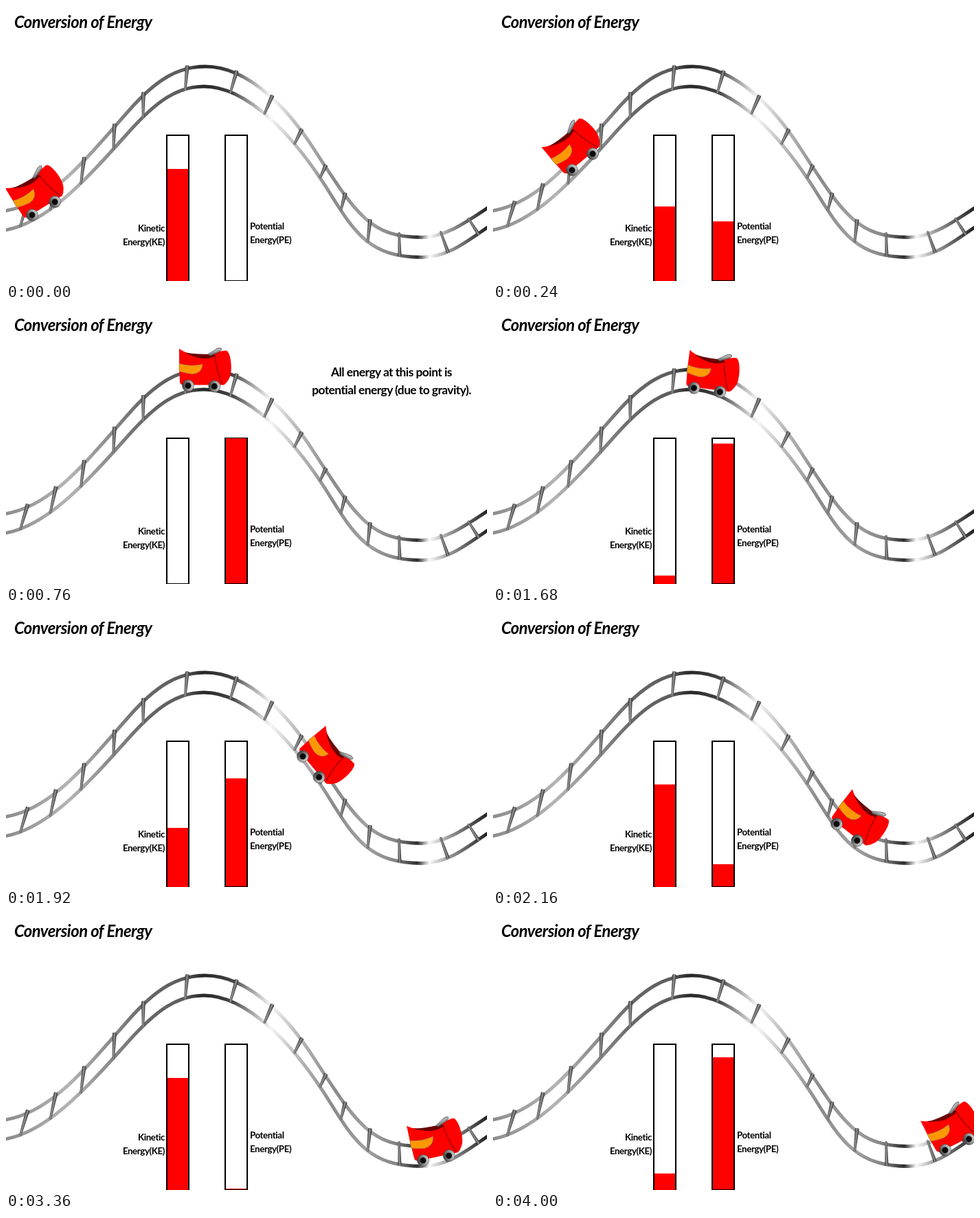
An HTML page that plays this animation: 700x400 px, repeating every 4.08 s.

```html
<!DOCTYPE html>
<html lang="en">
<head>
<meta charset="utf-8">
<title>Conversion of Energy</title>
<style>
html, body { margin: 0; width: 100%; height: 100%; overflow: hidden; background: #fff; }
svg { display: block; width: 700px; height: 400px; }
text { font-family: Lato, "Open Sans", sans-serif; font-weight: 700; }
.title { font-size: 23.8px; font-style: italic; letter-spacing: -.5px; }
.label { font-size: 13.3px; letter-spacing: -.4px; }
.note { font-size: 17.3px; letter-spacing: -.5px; text-anchor: middle; }
.end { text-anchor: end; }
.rail { fill: none; stroke: url(#steel); stroke-width: 5; }
.frame { fill: #fff; stroke: #000; stroke-width: 2; }
</style>
</head>
<body>
<svg viewBox="0 0 700 400">
  <defs>
    <linearGradient id="steel" gradientUnits="userSpaceOnUse" x1="0" x2="700" y1="0" y2="0">
      <stop offset="0" stop-color="#8c8c8c"/>
      <stop offset=".13" stop-color="#b4b4b4"/>
      <stop offset=".29" stop-color="#686868"/>
      <stop offset=".37" stop-color="#5c5c5c"/>
      <stop offset=".41" stop-color="#262626"/>
      <stop offset=".47" stop-color="#444"/>
      <stop offset=".5" stop-color="#8a8a8a"/>
      <stop offset=".55" stop-color="#f6f6f6"/>
      <stop offset=".6" stop-color="#bdbdbd"/>
      <stop offset=".68" stop-color="#8a8a8a"/>
      <stop offset=".75" stop-color="#a0a0a0"/>
      <stop offset=".81" stop-color="#858585"/>
      <stop offset=".855" stop-color="#2c2c2c"/>
      <stop offset=".88" stop-color="#fafafa"/>
      <stop offset=".92" stop-color="#9a9a9a"/>
      <stop offset="1" stop-color="#222"/>
    </linearGradient>
    <linearGradient id="post">
      <stop offset="0" stop-color="#222"/>
      <stop offset=".45" stop-color="#999"/>
      <stop offset="1" stop-color="#2a2a2a"/>
    </linearGradient>
    <linearGradient id="grip" x1="0" y1="0" x2=".5" y2="1">
      <stop offset="0" stop-color="#555"/>
      <stop offset=".5" stop-color="#bbb"/>
      <stop offset="1" stop-color="#333"/>
    </linearGradient>
    <linearGradient id="tyre">
      <stop offset="0" stop-color="#3c3c3c"/>
      <stop offset=".5" stop-color="#888"/>
      <stop offset="1" stop-color="#d0d0d0"/>
    </linearGradient>
    <g id="wheel">
      <circle r="8.5" fill="url(#tyre)" stroke="#444" stroke-width=".6"/>
      <circle r="4.4" fill="#0a0a0a"/>
    </g>
  </defs>

  <text class="title" x="12" y="32">Conversion of Energy</text>
  <path id="upper" class="rail" d="M-5 298.500C62 290 110 230 178 153C220 105 252 88 290 88
    C356 88 414 155 448 208C510 303 530 336.500 605 336.500C640 336.500 672 313 708 289"/>
  <path id="lower" class="rail" d="M-8 327C55 320 112 258 178 184C220 137 250 117 288 117
    C352 117 420 190 470 270C508 331 530 365.500 605 365.500C645 365.500 672 341 708 317"/>
  <g id="posts"></g>

  <rect class="frame" x="234" y="188" width="32" height="212"/>
  <rect class="frame" x="319" y="188" width="32" height="212"/>
  <rect id="kinetic" x="235" width="30" fill="red"/>
  <rect id="potential" x="320" width="30" fill="red"/>
  <text class="label end" x="231" y="328">Kinetic</text>
  <text class="label end" x="231" y="348">Energy(KE)</text>
  <text class="label" x="355" y="325">Potential</text>
  <text class="label" x="355" y="345">Energy(PE)</text>

  <g id="top" class="note">
    <text x="561" y="98">All energy at this point is</text>
    <text x="561" y="124">potential energy (due to gravity).</text>
  </g>
  <g id="bottom" class="note">
    <text x="587" y="122">All energy at this point is</text>
    <text x="587" y="147">kinetic energy</text>
    <text x="587" y="172">(due to motion).</text>
  </g>

  <g id="car">
    <g transform="rotate(-1.5)">
      <path d="M-13 -54Q-4 -47 8 -46Q18 -44 38 -46Q46 -51 56 -51Q60 -49 62 -37Q64 -22 61 -13Q57 -4 52 -1L-8 -1Q-12 -2 -12 -6L-13 -28Z" fill="red"/>
      <path d="M-5 -48.500Q10 -45 38 -46L40 -43Q30 -38 18 -40Q6 -42 -5 -48.500Z" fill="#6b0000"/>
      <path d="M39 -44Q41 -22 50 -2" fill="none" stroke="#7a0000"/>
      <path d="M-13 -32Q4 -27 21 -31Q20 -18 6 -17Q-3 -18 -13 -21Z" fill="#ff9800" stroke="#b08050" stroke-width=".8"/>
      <path d="M29 -46L42 -54Q47 -56 49 -54Q49 -51 45 -49L34 -44Q30 -43 29 -46Z" fill="url(#grip)" stroke="#444" stroke-width=".6"/>
    </g>
    <use href="#wheel"/>
    <use href="#wheel" x="38.300"/>
  </g>
</svg>
<script>
const LOOP = 4080, STEP = 40;
const $ = id => document.getElementById(id);
const mix = (a, b, f) => a + (b - a) * f;

// Height of a rail at x; both rails run left to right
function railY(rail, x) {
  let lo = 0, hi = rail.getTotalLength();
  while (hi - lo > .1) {
    const mid = (lo + hi) / 2;
    if (rail.getPointAtLength(mid).x < x) lo = mid; else hi = mid;
  }
  return rail.getPointAtLength(lo).y;
}

// Posts sway along the track and tip forward on the last climb
const lean = x => -6.5 - 6 * Math.cos((x - 400) * Math.PI / 200) + Math.max(0, x - 560) * .18;

function addPost(x) {
  const foot = x + lean(x);
  const y = railY($('upper'), x) - 5;
  const drop = railY($('lower'), foot) + 2 - y;
  const len = Math.hypot(foot - x, drop);
  const turn = Math.atan2(x - foot, drop) * 180 / Math.PI;
  const a = foot > x ? 1.6 : 2.9, b = foot > x ? 2.5 : 1.7;
  const el = document.createElementNS('http://www.w3.org/2000/svg', 'path');
  el.setAttribute('d', `M${-a} 1Q0 -1 ${a} 1L${b} ${len - 1}Q0 ${len + 1} ${-b} ${len - 1}Z`);
  el.setAttribute('fill', 'url(#post)');
  el.setAttribute('transform', `translate(${x} ${y}) rotate(${turn})`);
  $('posts').append(el);
}
[32, 73, 114, 158, 200, 264, 336, 388, 431, 466, 494, 530, 572, 632, 672].forEach(addPost);

// Key poses, each held from one time to another:
// from, to, rear wheel x, y, angle, top of kinetic bar, top of potential bar
const poses = [
  [0, 0, 38, 304, -30, 237, 400],
  [440, 480, 173, 176, -45, 337, 241],
  [760, 1640, 265, 111.5, 1.5, 400, 188],
  [1920, 2000, 432, 210, 52, 314, 242],
  [2200, 2240, 522, 328, 36, 235, 398],
  [2400, 3320, 574, 355, 6, 189, 398],
  [3360, 3360, 607, 357, -10.4, 237, 398],
  [3720, 3840, 658, 342, -25, 319, 275],
  [4000, LOOP, 658, 342, -25, 376, 207]
];

// Cubic from a to b, leaving and arriving along the given slopes
function hermite(a, b, da, db, f) {
  const g = 1 - f;
  return g * g * (1 + 2 * f) * a + f * f * (3 - 2 * f) * b + f * g * (g * da - f * db);
}

function poseAt(t) {
  const i = poses.findLastIndex(p => p[0] <= t);
  const a = poses[i], b = poses[i + 1];
  if (t <= a[1]) return a.slice(2);
  const f = (t - a[1]) / (b[0] - a[1]);
  const [, , x, y, angle, ...bars] = a.map((v, n) => mix(v, b[n], f));
  const chord = Math.hypot(b[2] - a[2], b[3] - a[3]);
  const curve = (n, trig) => hermite(a[n], b[n],
    chord * trig(a[4] * Math.PI / 180), chord * trig(b[4] * Math.PI / 180), f);
  return [curve(2, Math.cos), curve(3, Math.sin), angle, ...bars];
}

function setBar(id, top, base) {
  $(id).setAttribute('y', top);
  $(id).setAttribute('height', Math.max(0, base - top));
}

function show(id, on) {
  $(id).setAttribute('visibility', on ? 'visible' : 'hidden');
}

function draw(now) {
  const t = Math.floor(now % LOOP / STEP) * STEP;
  const [x, y, angle, ke, pe] = poseAt(t);
  $('car').setAttribute('transform', `translate(${x} ${y}) rotate(${angle})`);
  setBar('kinetic', ke, 400);
  setBar('potential', pe, 399);
  show('top', t >= 760 && t < 1680);
  show('bottom', t >= 2400 && t < 3360);
}

const start = performance.now();
function loop() {
  draw(performance.now() - start);
  requestAnimationFrame(loop);
}
loop();
</script>
</body>
</html>
```
